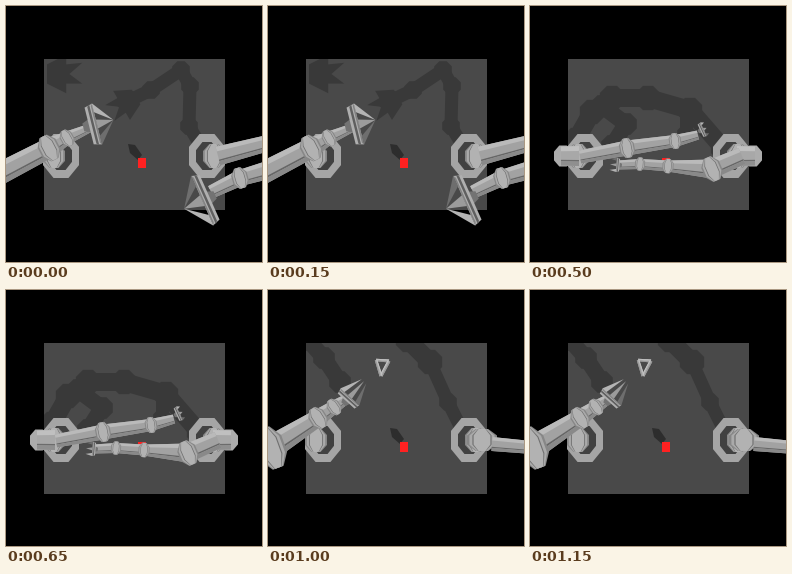
Write a matplotlib script that moves like this. It is 256x256 px and loops after 1.25 s.

```python
import numpy as np
import matplotlib.pyplot as plt
from matplotlib.animation import FuncAnimation
from matplotlib.patches import Polygon, Rectangle

SIZE = 256
TABLE, SHADE = 73, 57
RED = (1, .13, .13)

fig = plt.figure(figsize=(2.56, 2.56), dpi=100, facecolor="black")
ax = fig.add_axes([0, 0, 1, 1])
ax.axis("off")
ax.set_xlim(0, SIZE)
ax.set_ylim(SIZE, 0)
table = Rectangle((37.5, 52.5), 181, 151, color=(TABLE / 255,) * 3, lw=0)
ax.add_patch(table)
parts = []


def poly(tone, pts, clip=None):
    color = (tone / 255,) * 3 if np.isscalar(tone) else tone
    p = ax.add_patch(Polygon(pts, closed=True, facecolor=color, lw=0))
    if clip is not None:
        p.set_clip_path(clip)
    parts.append(p)


def place(pts, x, y, deg):
    """Turn local points (forward, sideways) and move them to x, y."""
    t = np.radians(deg)
    c, s = np.cos(t), np.sin(t)
    return np.array(pts) @ [[c, s], [-s, c]] + (x, y)


def octagon(w, h):
    t = np.radians(np.arange(22.5, 360, 45))
    return np.column_stack([np.cos(t) * w, np.sin(t) * h]) / 2 / np.cos(np.pi / 8)


def angle(a, b):
    return np.degrees(np.arctan2(b[1] - a[1], b[0] - a[0]))


def link(a, b, tone=162):
    """Tapered bar between (x, y, width) ends, lit above and dark below."""
    if a[0] > b[0]:
        a, b = b, a
    size, deg = np.hypot(b[0] - a[0], b[1] - a[1]), angle(a, b)
    for lo, hi, v in ((-.5, .5, tone), (-.5, -.25, tone + 24),
                      (.2, .28, tone - 60), (.28, .5, tone - 25)):
        poly(v, place([(0, a[2] * lo), (size, b[2] * lo),
                       (size, b[2] * hi), (0, a[2] * hi)], *a[:2], deg))


def housing(x, y, w, h, deg=0):
    """Joint body with a groove and a raised face."""
    for k, v in ((1, 135), (.84, 170), (.64, 112), (.56, 178)):
        poly(v, place(octagon(w * k, h), x, y, deg))


def arm(*joints):
    """Links through the joints, with a housing at each inner one."""
    for a, b in zip(joints, joints[1:]):
        link(a, b)
    for a, (x, y, w) in zip(joints, joints[1:-1]):
        housing(x, y, w, w * 1.3, angle(a, (x, y)))


def gripper(x, y, deg, span, reach, spread=0.):
    """Plate across the wrist; finger tips meet when spread is 0."""
    half, t = span / 2, min(span / 9, 4)
    poly(115, place([(-2.5 * t, -t), (-2.5 * t, t), (0, 2 * t), (0, -2 * t)],
                    x, y, deg))
    for lo, hi, v in ((-t, t, 175), (-t * .3, t * .3, 95), (t * .6, t, 130)):
        poly(v, place([(lo, -half * .9), (hi, -half),
                       (hi, half), (lo, half * .9)], x, y, deg))
    for side, v in ((-.8, 180), (.8, 110), (0, 155)):
        root, tip = side * half, side * half * spread
        poly(v, place([(t, root - half * .22), (reach, tip),
                       (t, root + half * .22)], x, y, deg))


def shadow(width, *pts):
    """Thick path cast on the table, rounded at its joints."""
    for a, b in zip(pts, pts[1:]):
        size, r = np.hypot(b[0] - a[0], b[1] - a[1]), width / 2
        poly(SHADE, place([(0, -r), (size, -r), (size, r), (0, r)],
                          *a, angle(a, b)), table)
    for p in pts:
        poly(SHADE, octagon(width * 1.35, width * 1.35) + p, table)


def claw_shadow(x, y, deg, size):
    star = [(-.5, -.3), (.1, -.6), (.1, -.3), (.6, -.35), (.2, 0),
            (.6, .3), (.1, .3), (.1, .6), (-.5, .3)]
    poly(SHADE, place(np.array(star) * size, x, y, deg), table)


def base(x, side, motor=True):
    """Mounting ring; the motor sits on the outer side."""
    for w, h, v in ((36, 44, 165), (22, 28, TABLE - 8)):
        poly(v, octagon(w, h) + (x, 150))
    housing(x + 7 * side, 150, 22, 24)
    if motor:
        poly(172, octagon(18, 21) + (x + 22 * side, 150))
        link((x + 6 * side, 150, 20), (x + 24 * side, 150, 19), 168)


def cube(height=9.5):
    link_shadow = [(122, 138), (129, 139), (136, 149), (132, 154), (124, 147)]
    if height > 9:
        poly(SHADE - 12, link_shadow, table)
    poly(RED, [(131.6, 152), (139.8, 152), (139.8, 152 + height),
               (132, 152 + height)])


def reach_out():
    shadow(13, (120, 96), (145, 84), (175, 64), (184, 80), (183, 120), (196, 142))
    claw_shadow(118, 98, 150, 28)
    claw_shadow(57, 68, 0, 32)
    cube()
    base(55, -1, False)
    base(201, 1, False)
    arm((-5, 167, 22), (43, 142, 20), (61, 132, 13), (86, 121, 8))
    gripper(87, 119, -14, 42, 21)
    arm((212, 150, 19), (262, 137, 16))
    arm((262, 164, 18), (234, 172, 16), (205, 186, 13))
    gripper(200, 193, 156, 54, 24)


def cross_over():
    shadow(14, (45, 130), (60, 108), (82, 82), (112, 68), (126, 64))
    shadow(14, (84, 76), (98, 104))
    shadow(9, (118, 60), (152, 95), (192, 140))
    cube()
    base(55, -1)
    base(201, 1)
    arm((54, 157, 10), (94, 115, 13), (134, 84, 9), (151, 78, 9))
    gripper(152, 78, -8, 42, 15, 1)
    arm((212, 147, 18), (236, 164, 24))
    arm((226, 188, 36), (199, 192, 19), (163, 197, 15), (139, 206, 11),
        (121, 221, 9))
    housing(226, 187, 46, 38, -10)
    gripper(119, 225, 150, 46, 24, .6)


def converge():
    shadow(18, (46, 134), (62, 106), (82, 92), (118, 92), (160, 104), (193, 142))
    shadow(16, (72, 100), (96, 118), (82, 140))
    shadow(13, (156, 104), (156, 128))
    base(55, -1)
    base(201, 1)
    arm((50, 151, 13), (97, 142, 15), (145, 135, 12), (168, 129, 9))
    gripper(172, 124, -25, 15, 5, 1)
    cube(4)
    arm((212, 150, 17), (182, 163, 19), (138, 160, 11), (110, 158, 10),
        (88, 159, 9))
    gripper(88, 159, 185, 14, 8, 1)


def pick():
    shadow(14, (40, 75), (66, 92), (100, 87), (125, 62))
    shadow(9, (125, 62), (192, 138))
    shadow(13, (90, 92), (97, 124))
    shadow(11, (104, 90), (130, 118))
    cube()
    base(55, -1)
    base(201, 1, False)
    arm((65, 154, 20), (84, 153, 14), (110, 151, 11), (137, 143, 12))
    housing(59, 157, 39, 42)
    gripper(139, 140, -17, 46, 7, 1)
    poly(RED, [(132, 154), (136, 152), (140, 160), (133, 161)])
    arm((214, 151, 18), (258, 162, 19))
    arm((262, 176, 36), (240, 183, 25), (196, 192, 19), (174, 196, 21),
        (140, 199, 12))
    gripper(138, 201, 152, 46, 9, 1)


def lift():
    shadow(16, (40, 50), (56, 68), (72, 92))
    shadow(18, (140, 50), (162, 72))
    shadow(13, (162, 72), (180, 112), (194, 140))
    cube()
    base(55, -1, False)
    base(201, 1, False)
    arm((4, 157, 24), (50, 128, 17), (66, 117, 13), (80, 108, 9))
    housing(3, 158, 28, 42, -20)
    gripper(80, 109, -48, 25, 24, .3)
    tips = (108, 70, 2.5), (121, 71, 3), (113, 86, 3)
    for a, b in zip(tips, tips[1:] + tips[:1]):
        link(a, b, 175)
    housing(214, 150, 30, 22)
    arm((224, 154, 14), (258, 157, 13))


POSES = (reach_out, cross_over, converge, pick, lift)


def draw(i):
    while parts:
        parts.pop().remove()
    POSES[i % len(POSES)]()
    return []


anim = FuncAnimation(fig, draw, frames=len(POSES), interval=250,
                     init_func=lambda: draw(0), repeat=True, repeat_delay=0,
                     blit=False)
plt.show()
```
